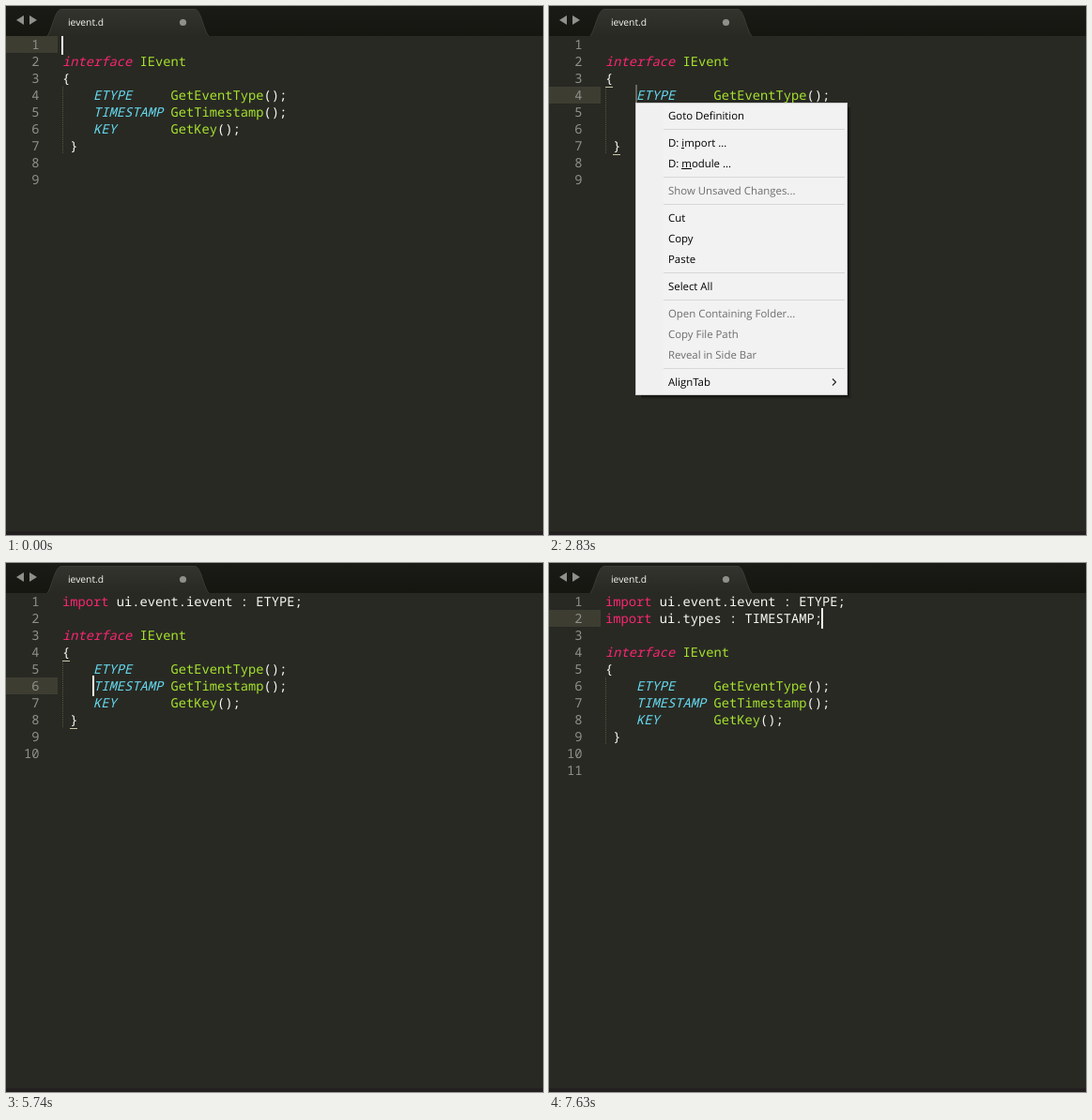
Recreate the animation shown at these times as an HTML page with a canvas. Size 572x564 px, loop 8 s.

```html
<!DOCTYPE html>
<html lang="en">
<head>
<meta charset="utf-8">
<title>Editor: add imports</title>
<style>
  html, body { margin: 0; width: 100%; height: 100%; overflow: hidden; background: #282923; }
  canvas { display: block; }
</style>
</head>
<body>
<canvas id="stage" width="572" height="564"></canvas>
<script>
const ctx = document.getElementById('stage').getContext('2d', { alpha: false });
const LOOP = 8000, TOP = 32, LINE = 18, LEFT = 60, CHAR = 8.25;
const BG = '#282923', PINK = '#f92672', GREEN = '#a6e22e', BLUE = '#66d9ef', WHITE = '#f8f8f2', GRAY = '#8f908a';
const CODE_FONT = '13.75px "Noto Sans Mono", monospace';
const UI_FONT = '"Open Sans", sans-serif';

// A line of code is a list of [column, text, colour, italic].
const importLine = rest => [[0, 'import', PINK], [7, rest, WHITE]];
const member = (type, name) => [[4, type, BLUE, true], [14, name, GREEN], [14 + name.length, '();', WHITE]];
const imports = [importLine('ui.event.ievent : ETYPE;'), importLine('ui.types : TIMESTAMP;')];
const body = [
  [],
  [[0, 'interface', PINK, true], [10, 'IEvent', GREEN]],
  [[0, '{', WHITE]],
  member('ETYPE', 'GetEventType'),
  member('TIMESTAMP', 'GetTimestamp'),
  member('KEY', 'GetKey'),
  [[1, '}', WHITE]],
  [], []
];

// [time, line, column]: each entry places the caret and restarts its blinking.
const carets = [
  [0, 1, 0], [70, 2, 0], [240, 3, 0], [390, 4, 0], [850, 4, 1], [1020, 4, 2], [1170, 4, 3], [1340, 4, 4],
  [2420, 4, 4], [3530, 1, 31], [4260, 1, 31], [4640, 5, 4], [5190, 6, 4], [5740, 6, 4],
  [6300, 6, 4], [6930, 6, 4], [7480, 6, 4], [7630, 2, 28]
];
const menus = [
  { shadow: 2360, open: 2420, hover: 2950, close: 3530, top: 103 },
  { shadow: 6130, open: 6130, hover: 6770, close: 7630, top: 139 }
];
// '-' is a separator, '~' marks a disabled item, '_' underlines the next letter.
const items = ['Goto Definition', '-', 'D: _import ...', 'D: _module ...', '-', '~Show Unsaved Changes...', '-',
  'Cut', 'Copy', 'Paste', '-', 'Select All', '-',
  '~Open Containing Folder...', '~Copy File Path', '~Reveal in Side Bar', '-', 'AlignTab'];

function rect(x, y, w, h, color) {
  ctx.fillStyle = color;
  ctx.fillRect(x, y, w, h);
}

function text(str, x, y, color, font, align = 'left') {
  ctx.font = font;
  ctx.fillStyle = color;
  ctx.textAlign = align;
  ctx.fillText(str, x, y);
}

function shape(points, color) {
  ctx.beginPath();
  points.forEach(p => ctx.lineTo(...p));
  ctx.fillStyle = color;
  ctx.fill();
}

function vertical(y0, y1, from, to) {
  const g = ctx.createLinearGradient(0, y0, 0, y1);
  g.addColorStop(0, from);
  g.addColorStop(1, to);
  return g;
}

function drawTabBar() {
  rect(0, 0, 572, TOP, vertical(0, TOP, '#1a1b16', '#151610'));
  shape([[11, 15], [19, 10], [19, 20]], GRAY);
  shape([[33, 15], [25, 10], [25, 20]], GRAY);
  ctx.beginPath();
  ctx.moveTo(44, TOP);
  ctx.bezierCurveTo(49, 26, 52, 3.5, 59, 3.5);
  ctx.lineTo(201, 3.5);
  ctx.bezierCurveTo(208, 3.5, 210, 26, 216, TOP);
  ctx.fillStyle = vertical(3, TOP, '#33342e', BG);
  ctx.fill();
  ctx.strokeStyle = '#3b3c36';
  ctx.lineWidth = 1;
  ctx.stroke();
  text('ievent.d', 66, 21, WHITE, '10.3px ' + UI_FONT);
  ctx.beginPath();
  ctx.arc(188.5, 17.5, 3.6, 0, 7);
  ctx.fillStyle = GRAY;
  ctx.fill();
}

function drawCode(lines, added, caretLine) {
  rect(0, TOP + (caretLine - 1) * LINE, 55, LINE, '#3e3d32');
  lines.forEach((tokens, i) => {
    const y = TOP + i * LINE + 14;
    text(i + 1, 35.5, y, GRAY, CODE_FONT, 'right');
    for (const [col, str, color, italic] of tokens)
      text(str, LEFT + col * CHAR, y, color, (italic ? 'italic ' : '') + CODE_FONT);
  });
  const open = TOP + (added + 3) * LINE, close = open + 4 * LINE;
  for (let y = open; y < close; y += 2) rect(60, y, 1, 1, '#55573a');
  if (caretLine >= added + 3) {
    rect(60, open, 8, 1, '#c9c5a8');
    rect(68, close, 8, 1, '#c9c5a8');
  }
}

function drawCaret([start, line, col], t) {
  const phase = (t - start) % 620;
  ctx.globalAlpha = phase < 380 ? 1 : phase < 460 ? 0.3 : 0;
  rect(Math.floor(59 + col * CHAR), TOP + (line - 1) * LINE - 2, 2, 22, WHITE);
  ctx.globalAlpha = 1;
}

function drawMenu({ top, open, hover }, t) {
  for (let i = 0; i < 4; i++) {
    const shade = `rgba(0,0,0,${0.48 - i * 0.13})`;
    rect(318 + i, top + 5, 1, 307 + i, shade);
    rect(98, top + 312 + i, 221 + i, 1, shade);
  }
  if (t < open) return;
  rect(92, top, 226, 312, '#cccccc');
  rect(93, top + 1, 224, 310, '#f2f2f2');
  rect(95, top + 3, 27, 306, '#f0f0f0');
  let y = top + 3;
  for (const item of items) {
    if (item === '-') {
      rect(122, y + 3, 193, 1, '#d7d7d7');
      y += 7;
      continue;
    }
    const mark = item.indexOf('_'), label = item.replace(/[~_]/, ''), base = y + 15;
    if (t >= hover && label.startsWith('D: i')) rect(95, y, 220, 22, '#91c9f7');
    text(label, 127, base, item[0] === '~' ? '#6d6d6d' : '#000', '11.4px ' + UI_FONT);
    if (mark > 0) {
      const x = 127 + ctx.measureText(label.slice(0, mark)).width;
      rect(Math.round(x), base + 1, Math.round(ctx.measureText(label[mark]).width), 1, '#000');
    }
    y += 22;
  }
  ctx.beginPath();
  [[302, -3.5], [305.5, 0], [302, 3.5]].forEach(([x, dy]) => ctx.lineTo(x, top + 298 + dy));
  ctx.strokeStyle = '#222';
  ctx.lineWidth = 1.1;
  ctx.stroke();
}

function frame() {
  const t = performance.now() % LOOP;
  const caret = carets.findLast(c => c[0] <= t);
  const added = menus.filter(m => t >= m.close).length;
  const menu = menus.find(m => t >= m.shadow && t < m.close);
  rect(0, 0, 572, 564, BG);
  rect(0, 560, 572, 4, '#231f20');
  drawCode([...imports.slice(0, added), ...body], added, caret[1]);
  drawCaret(caret, t);
  drawTabBar();
  if (menu) drawMenu(menu, t);
  requestAnimationFrame(frame);
}

ctx.textRendering = 'geometricPrecision';
frame();
</script>
</body>
</html>
```
